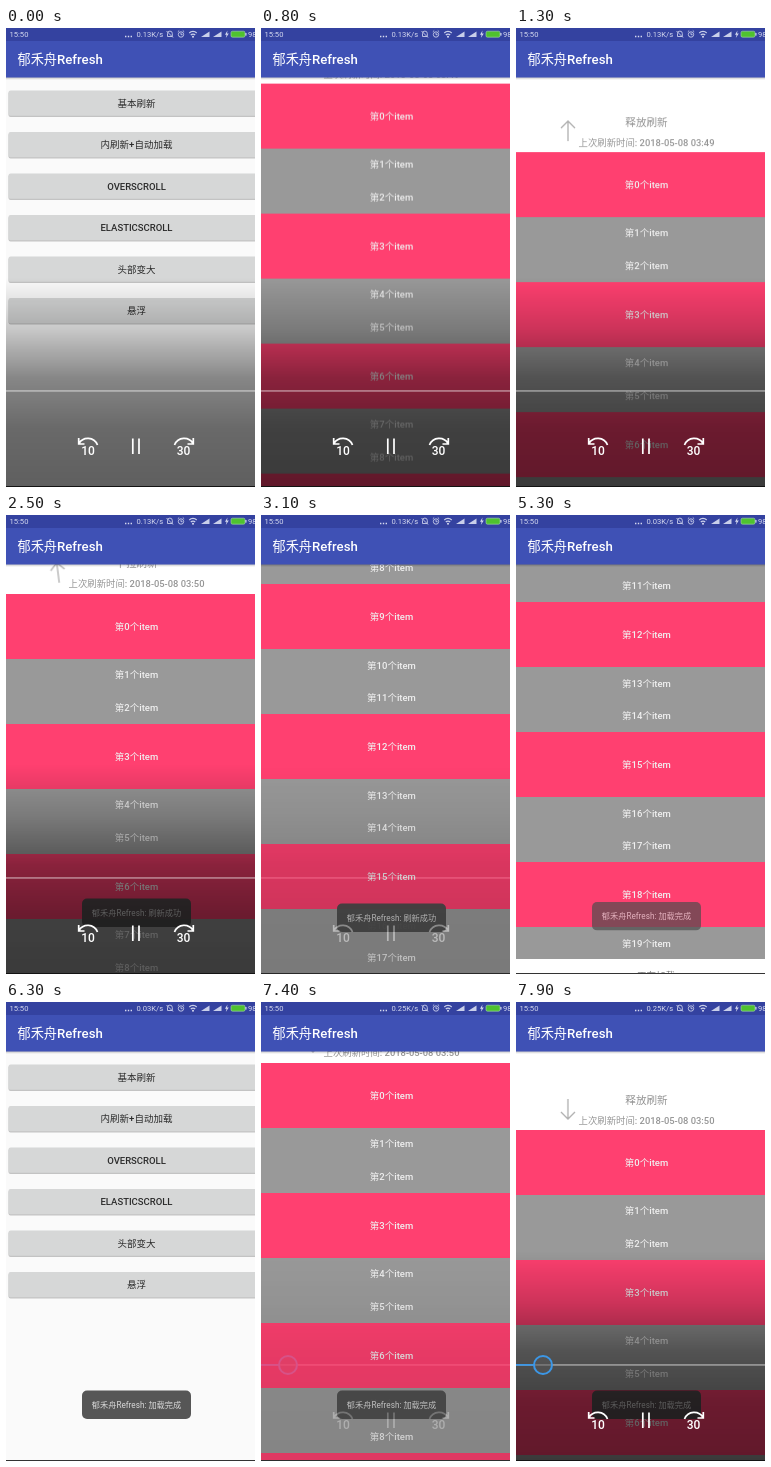
An HTML page that plays this animation: 249 px wide and 459 px high, repeating every 8 s.

```html
<!DOCTYPE html>
<html lang="zh-CN">
<head>
<meta charset="utf-8">
<title>Refresh</title>
<style>
html, body { margin: 0; width: 100%; height: 100%; overflow: hidden; background: #fafafa; }
svg { display: block; width: 100%; height: 100%; }
text { font-family: Roboto, "Noto Sans CJK SC", "Noto Sans CJK", sans-serif; }
.mid { text-anchor: middle; }
.status { font-size: 7.6px; fill: #d5d9ef; }
.title { font-size: 13.2px; fill: #fff; }
.title .latin { font-weight: 500; }
.button { font-size: 9.5px; font-weight: 500; fill: #2b2b2b; }
.item { font-size: 9.5px; font-weight: 500; fill: #f0f0f0; }
.hint { font-size: 10.6px; font-weight: 500; fill: #959595; }
.time { font-size: 9.4px; font-weight: 500; fill: #959595; }
.more { font-size: 9.5px; fill: #777; }
.toast text { font-size: 8.2px; fill: #d8d8d8; }
.skip { font-size: 12px; font-weight: 500; fill: #fff; }

/* One shared 8 s clock: 1.25% = 100 ms */
.page, .list, .arrow, .toast, .player { animation: 8s linear infinite both; }
.flip { animation: 8s step-end infinite both; }

.page { animation-name: page; }
@keyframes page {
  0%, 1.5% { transform: translateX(249px); animation-timing-function: ease-out; }
  7.5%, 76.8% { transform: translateX(0); }
  78.6%, 86.2% { transform: translateX(249px); }
  86.24%, 100% { transform: translateX(0); }
}
.list { animation-name: list; }
@keyframes list {
  0%, 9.5% { transform: translateY(49px); }
  16.25% { transform: translateY(123px); animation-timing-function: ease-out; }
  20%, 20.8% { transform: translateY(134px); animation-timing-function: ease-out; }
  22.5%, 28.2% { transform: translateY(91px); }
  31.25% { transform: translateY(78px); }
  33.2% { transform: translateY(49px); }
  38.75% { transform: translateY(-321px); animation-timing-function: ease-out; }
  42.5% { transform: translateY(-419.5px); animation-timing-function: ease-out; }
  47.5%, 51.5% { transform: translateY(-455px); }
  52.5%, 53.5% { transform: translateY(-458px); }
  57.5%, 64.4% { transform: translateY(-453.5px); animation-timing-function: ease-out; }
  69%, 79% { transform: translateY(-419.5px); }
  79.1%, 91.5% { transform: translateY(49px); }
  98.75%, 100% { transform: translateY(127px); }
}
.arrow { transform-box: fill-box; transform-origin: center; animation-name: arrow; }
@keyframes arrow {
  0%, 13.75% { transform: rotate(180deg); opacity: 1; }
  15.6%, 21.8% { transform: rotate(0deg); opacity: 1; }
  21.85%, 28.7% { transform: rotate(0deg); opacity: 0; }
  28.75%, 30.8% { transform: rotate(0deg); opacity: 1; }
  31.25% { transform: rotate(-6deg); }
  33.2%, 100% { transform: rotate(-180deg); opacity: 1; }
}

.pull { animation-name: pull; }
.release { animation-name: release; }
.busy { animation-name: busy; }
.before { animation-name: before; }
.after { animation-name: after; }
@keyframes pull { 0%, 28.7% { opacity: 1 } 13.75%, 98.1%, 100% { opacity: 0 } }
@keyframes release { 0%, 21.8% { opacity: 0 } 13.75%, 98.1%, 100% { opacity: 1 } }
@keyframes busy { 0%, 28.7%, 100% { opacity: 0 } 21.8% { opacity: 1 } }
@keyframes before { 0% { opacity: 1 } 28.7%, 100% { opacity: 0 } }
@keyframes after { 0% { opacity: 0 } 28.7%, 100% { opacity: 1 } }

.more-pull { animation-name: more-pull; }
.more-release { animation-name: more-release; }
.more-busy { animation-name: more-busy; }
@keyframes more-pull { 0% { opacity: 1 } 46.2%, 100% { opacity: 0 } }
@keyframes more-release { 0%, 55%, 100% { opacity: 0 } 46.2% { opacity: 1 } }
@keyframes more-busy { 0%, 100% { opacity: 0 } 55% { opacity: 1 } }

.rate-a { animation-name: rate-a; }
.rate-b { animation-name: rate-b; }
.rate-c { animation-name: rate-c; }
@keyframes rate-a { 0% { opacity: 1 } 52.45%, 100% { opacity: 0 } }
@keyframes rate-b { 0%, 89.95%, 100% { opacity: 0 } 52.45% { opacity: 1 } }
@keyframes rate-c { 0% { opacity: 0 } 89.95%, 100% { opacity: 1 } }

.refreshed { animation-name: refreshed; }
.loaded { animation-name: loaded; }
@keyframes refreshed {
  0%, 29% { opacity: 0; transform: translateY(8px); }
  31.25% { opacity: 1; transform: translateY(-5px); }
  33%, 58.7% { opacity: 1; transform: translateY(0); }
  61.2%, 100% { opacity: 0; transform: translateY(0); }
}
@keyframes loaded {
  0%, 64.5% { opacity: 0; transform: translateY(8px); }
  66.9% { opacity: 1; transform: translateY(-5px); }
  68.7%, 100% { opacity: 1; transform: translateY(0); }
}

.player { animation-name: player; }
@keyframes player {
  0%, 35% { opacity: 1; }
  40.6%, 92% { opacity: 0; }
  94.5%, 100% { opacity: 1; }
}
.seek { animation-name: seek; }
@keyframes seek { 0% { opacity: 0 } 50%, 100% { opacity: 1 } }
</style>
</head>
<body>
<svg viewBox="0 0 249 459">
  <defs>
    <linearGradient id="shade" gradientUnits="userSpaceOnUse" x1="0" y1="249" x2="0" y2="459">
      <stop offset="0" stop-opacity="0"/>
      <stop offset=".24" stop-opacity=".19"/>
      <stop offset=".48" stop-opacity=".46"/>
      <stop offset=".72" stop-opacity=".58"/>
      <stop offset="1" stop-opacity=".62"/>
    </linearGradient>
    <linearGradient id="drop" x1="0" y1="0" x2="0" y2="1">
      <stop offset="0" stop-opacity=".25"/>
      <stop offset="1" stop-opacity="0"/>
    </linearGradient>
    <g id="bar">
      <rect y="49" width="249" height="3" fill="url(#drop)"/>
      <rect width="249" height="49.5" fill="#3f51b5"/>
      <text class="title" x="11.5" y="36"><tspan>郁禾舟</tspan><tspan class="latin">Refresh</tspan></text>
    </g>
    <path id="signal" d="M0 5.500L8.500 0V5.500Z" fill="#c9cfea"/>
    <g id="toast-box">
      <rect x="76" y="388.5" width="109" height="28.5" rx="5" fill="#4d4d4d" fill-opacity=".95"/>
    </g>
  </defs>

  <rect width="249" height="459" fill="#fafafa"/>
  <g id="menu"></g>
  <use href="#bar"/>

  <g class="page">
    <rect width="249" height="459" fill="#fff"/>
    <g class="list">
      <path class="arrow" d="M52 -30V-10M45 -23L52 -30L59 -23" fill="none" stroke="#b0b0b0" stroke-width="1.3"/>
      <g class="hint mid">
        <text class="flip pull" x="130.5" y="-25.5">下拉刷新</text>
        <text class="flip release" x="130.5" y="-25.5">释放刷新</text>
        <text class="flip busy" x="130.5" y="-25.5">正在刷新</text>
      </g>
      <g class="time mid">
        <text class="flip before" x="130.5" y="-5.5">上次刷新时间: 2018-05-08 03:49</text>
        <text class="flip after" x="130.5" y="-5.5">上次刷新时间: 2018-05-08 03:50</text>
      </g>
      <g id="items" transform="translate(0 .8)"></g>
      <g class="more mid">
        <text class="flip more-pull" x="140" y="897.5">上拉加载</text>
        <text class="flip more-release" x="140" y="897.5">释放加载</text>
        <text class="flip more-busy" x="140" y="897.5">正在加载</text>
      </g>
    </g>
    <use href="#bar"/>
  </g>

  <g class="status">
    <rect width="249" height="13" fill="#3442a0"/>
    <text x="3.5" y="9.2">15:50</text>
    <path d="M119 8.5h1.4m1.4 0h1.4m1.4 0h1.4" stroke="#d5d9ef" stroke-width="1.4"/>
    <text class="flip rate-a" x="130.5" y="9.2">0.13K/s</text>
    <text class="flip rate-b" x="130.5" y="9.2">0.03K/s</text>
    <text class="flip rate-c" x="130.5" y="9.2">0.25K/s</text>
    <g fill="none" stroke="#c9cfea" stroke-width=".9">
      <path d="M161.5 8.5V5.5a2.4 2.4 0 0 1 4.8 0V8.5ZM160.5 3L167 9.5"/>
      <circle cx="175" cy="6.5" r="2.7"/>
      <path d="M175 4.8V6.7H176.6M171.8 3.8L173.2 2.5M178.2 3.800L176.8 2.5"/>
      <path d="M183.3 5a5 5 0 0 1 7.4 0M184.8 7a3 3 0 0 1 4.400 0" stroke-width="1.2"/>
    </g>
    <circle cx="187" cy="8.8" r="1"/>
    <use href="#signal" x="195" y="3.5"/>
    <use href="#signal" x="207" y="3.5"/>
    <path d="M221.5 2.5L219 6.7H220.6L219.8 10L222.800 5.5H221Z"/>
    <rect x="225" y="3.2" width="14" height="6" rx="1.500" fill="#4fc22f" stroke="#a9d8b4" stroke-width=".6"/>
    <rect x="239.3" y="5" width="1.2" height="2.600"/>
    <text x="242" y="9.2">98</text>
  </g>

  <g class="toast refreshed">
    <use href="#toast-box"/>
    <text class="mid" x="130.5" y="406">郁禾舟Refresh: 刷新成功</text>
  </g>
  <g class="toast loaded">
    <use href="#toast-box"/>
    <text class="mid" x="130.5" y="406">郁禾舟Refresh: 加载完成</text>
  </g>
  <rect y="458" width="249" height="1" fill="#333"/>

  <g class="player">
    <rect y="249" width="249" height="210" fill="url(#shade)"/>
    <rect y="362.3" width="249" height="1.3" fill="#fff" fill-opacity=".55"/>
    <g class="flip seek">
      <path d="M0 362.900H18" stroke="#3c97e6" stroke-width="1.800"/>
      <circle cx="27" cy="363" r="9" fill="#555" fill-opacity=".5" stroke="#3c97e6" stroke-width="2"/>
    </g>
    <g fill="none" stroke="#fff" stroke-width="1.7">
      <path d="M73 415.5C77 408.5 88 408.5 91.5 417M72.7 410V416H78.5"/>
      <path d="M187 415.5C183 408.5 172 408.5 168.5 417M187.3 410V416H181.5"/>
      <path d="M126.800 410.5V426M133 410.5V426"/>
    </g>
    <g class="skip mid">
      <text x="82" y="427">10</text>
      <text x="177.5" y="427">30</text>
    </g>
  </g>
</svg>
<script>
const byId = id => document.getElementById(id);
const labels = ['基本刷新', '内刷新+自动加载', 'OVERSCROLL', 'ELASTICSCROLL', '头部变大', '悬浮'];

byId('menu').innerHTML = labels.map((label, i) => {
  const y = 62.5 + i * 41.5;
  return `<rect x="2.5" y="${y + 1}" width="256" height="25.5" rx="2" fill="#000" fill-opacity=".22"/>
    <rect x="2.5" y="${y}" width="256" height="25.3" rx="2" fill="#d6d7d7"/>
    <text class="button mid" x="130.5" y="${y + 16.4}">${label}</text>`;
}).join('');

// Every third row is tall and pink, the others are half as high.
const offsets = [0, 65, 97.5];
byId('items').innerHTML = Array.from({ length: 20 }, (_, i) => {
  const tall = i % 3 === 0;
  const y = Math.floor(i / 3) * 130 + offsets[i % 3];
  const height = tall ? 65 : 32.5;
  return `<rect y="${y}" width="249" height="${height}" fill="${tall ? '#ff4070' : '#999'}" shape-rendering="crispEdges"/>
    <text class="item mid" x="130.5" y="${y + height / 2 + 3.4}">第${i}个item</text>`;
}).join('');
</script>
</body>
</html>
```
